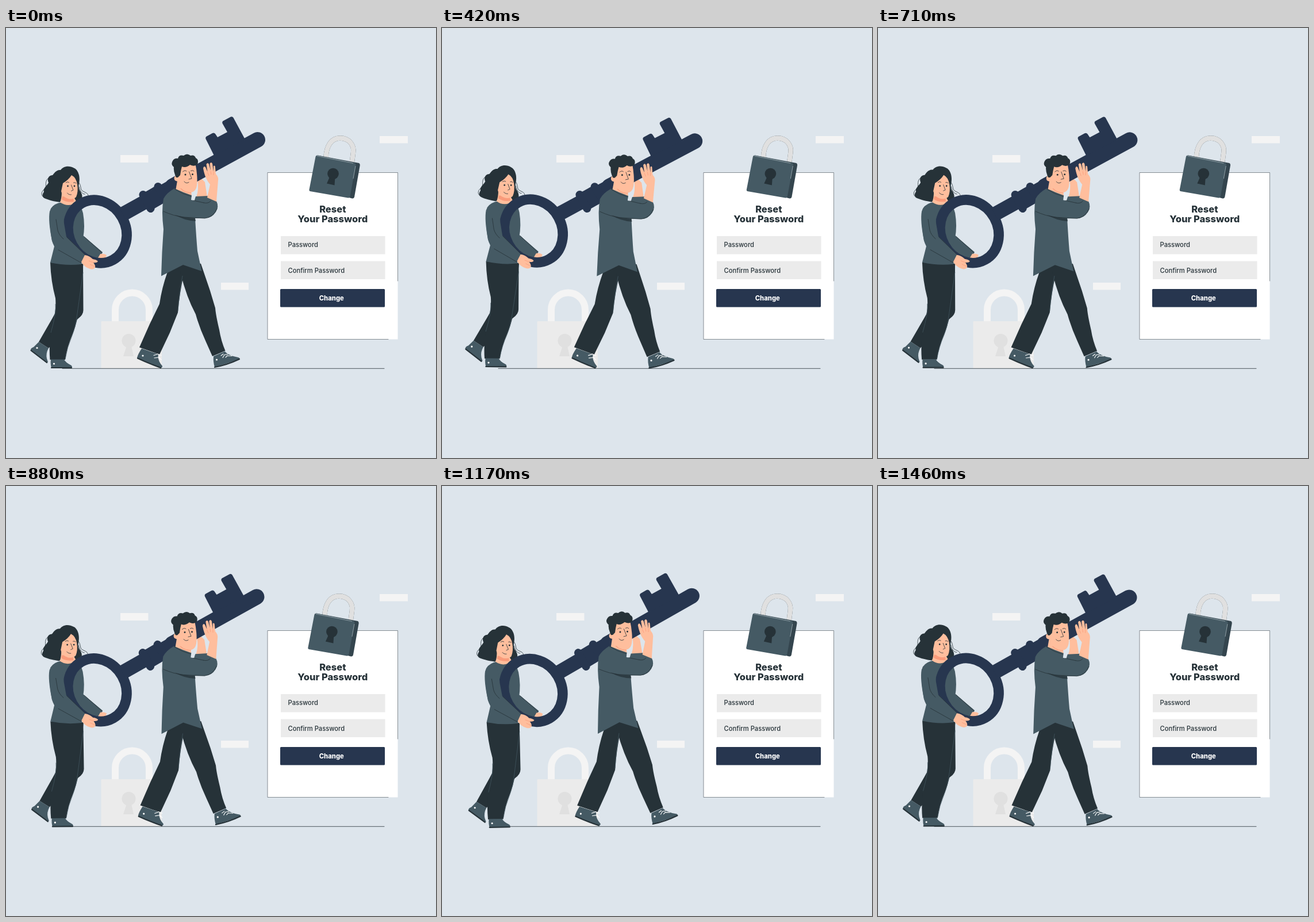
Animation, 748 px wide and 748 px high, one loop 1.5 s. Source, as an HTML page:

```html
<!DOCTYPE html>
<html lang="en">
<head>
<meta charset="utf-8">
<title>Reset your password</title>
<style>
  html, body { margin: 0; height: 100%; overflow: hidden; background: #dde5ec; }
  svg { display: block; width: 100vw; height: 100vh; font-family: Montserrat, Inter, sans-serif; }
  .dark { fill: #263238; }
  .cloth { fill: #455a64; }
  .skin { fill: #ffbe9d; }
  .shade { fill: #f99b7b; }
  .navy { fill: #27364f; }
  .grey { fill: #ebebeb; }
  .line { fill: none; stroke: #263238; stroke-width: .8; stroke-linecap: round; stroke-linejoin: round; }
  .seam { fill: none; stroke: #455a64; stroke-width: .7; }
  .shaft { fill: none; stroke: #27364f; }
  .sole { fill: none; stroke: #263238; stroke-width: 2.2; stroke-linecap: round; }
  .lace { fill: none; stroke: #fff; stroke-width: 1.1; stroke-linecap: round; }
  text { fill: #263238; }
</style>
</head>
<body>
<svg viewBox="0 0 748 748">
  <!-- backdrop -->
  <path fill="#f4f4f4" d="M199 221h48.500v13h-48.500zM650 188h49v12.500h-49zM374 443h48v12.500h-48z"/>
  <path fill="none" stroke="#f4f4f4" stroke-width="12" d="M190 511V490a29.500 29.500 0 0 1 59 0V511"/>
  <path class="grey" d="M165.500 511.500Q165.500 510 167 510H269Q271 510 271 512V592H165.500Z"/>
  <path fill="#e0e0e0" d="M210 553L204 571H222L218 553Z"/>
  <circle cx="213.500" cy="544" r="12" fill="#e0e0e0"/>
  <path class="line" d="M98 592.300H658"/>

  <!-- form -->
  <path fill="#fff" d="M455 251.500H681.500V541.500H455Z"/>
  <path class="line" opacity=".65" d="M681.500 440V251.500H455V541.500H665"/>
  <g text-anchor="middle" font-weight="800" font-size="16.500">
    <text x="568.300" y="320.500">Reset</text>
    <text x="568.300" y="338">Your Password</text>
  </g>
  <path class="grey" d="M478 362H659.500V393.500H478ZM478 405.500H659.500V437H478Z"/>
  <rect class="navy" x="477" y="454" width="182" height="31.500" rx="1.500"/>
  <g font-size="11.200" font-weight="500">
    <text x="490.500" y="381">Password</text>
    <text x="490.500" y="426">Confirm Password</text>
    <text x="566.300" y="473.500" text-anchor="middle" font-weight="800" style="fill:#fff">Change</text>
  </g>

  <!-- padlock -->
  <g id="lock">
    <path id="shackle" fill="none" stroke-width="8.300" d="M556.500 226C557 205 566 191.500 581 191.500C598 191.500 606 205 604 217L601.500 236"/>
    <use href="#shackle" stroke="#37474f" stroke-width="9.300"/>
    <use href="#shackle" stroke="#e0e0e0"/>
    <path fill="#34454e" d="M542 221.500L614 235Q616 236 615.700 239L606 294Q605 297 602 296.500L590 293Z"/>
    <path class="cloth" d="M542 221.500L606 234.500Q609 235 608.500 238L598.500 293Q598 296 595 295.500L529 284Q527 283.500 527.500 281L538.500 224Q539 221 542 221.500Z"/>
    <path fill="none" stroke="#c5d0d5" stroke-width=".6" d="M541 222.500L604 235.200M608 240L604 262"/>
    <path class="dark" d="M564 257L558 270.500L571.500 273.500L572.500 258Z"/>
    <circle class="dark" cx="569" cy="253.500" r="9.800"/>
  </g>

  <g id="carriers">
    <!-- woman: legs -->
    <path class="dark" d="M134 408L134.500 490Q135 499 125 506L112 518L74 557L57 546L80 506L100 470Z"/>
    <path class="dark" d="M77 408Q78 440 86 470Q88 492 80 517Q74 548 76.500 577H103Q106 555 116 532Q124 512 126 493L134.500 410Z"/>
    <path class="seam" d="M134 425L124 497Q121 520 115 535Q106 556 103 576M86 480Q88 495 78 530"/>
    <path class="cloth" d="M57 546L74 557Q69 566 71 575L73 581Q71 584 66 579L43 561Q42 557 48 555Z"/>
    <path class="sole" d="M43.500 561L71 582"/>
    <path class="cloth" d="M78 576.500H101Q104 582 112 586Q116 588 114.500 591H79Q77 585 78 576.500Z"/>
    <path class="sole" d="M79 591H114"/>
    <g fill="#fff"><circle cx="54" cy="556.500" r="1.600"/><circle cx="83.500" cy="584" r="1.600"/></g>

    <!-- woman: head and torso -->
    <path class="dark" d="M119 244C109 238 99 241 95 247C87 246 83 254 81 256C74 256 71 263 74 269C70 276 64 279 66 285C62 291 63 295 69 297C79 301 88 302 93 303L111 296L125 303Q137 298 130 285Q125 280 127 271C130 256 124 246 119 244Z"/>
    <path class="line" d="M77 259C64 266 73 275 67 280S61 290 64 293M126 268C132 274 128 281 134 284S143 288 143 292M127 276C129 286 134 289 137 289"/>
    <path class="cloth" d="M97 303Q84 305 78 314Q73 330 80 370L84 380L77 408Q104 414 131 411L137 388L134 366Q138 345 134 322Q131 309 122 303Z"/>
    <path class="skin" d="M97 283Q97 297 94 303Q108 313 123 303L118 294Z"/>
    <path class="shade" d="M97 298Q105 304 118 302L117 295L98 293Z"/>
    <path class="skin" d="M99 270Q109 264 114 256Q122 260 124 272Q126 285 122 294Q117 299 108 297Q98 294 96 284Z"/>
    <path class="line" d="M104 269Q107 266.500 109.500 268.500M117.500 269Q120 268 122 270M113.500 273L117 282L113.500 283.500M106.500 287Q109 290.500 113.500 290"/>
    <g class="dark"><circle cx="107.500" cy="275" r="1.400"/><circle cx="119" cy="275" r="1.400"/></g>
    <path class="cloth" d="M134 361L168 390L162 402L128 390Z"/>
    <path class="line" d="M136 363L167 391"/>
    <path class="skin" d="M164 393Q171 392 175 395L171 405L157 405Z"/>

    <!-- man: far arm -->
    <path class="skin" d="M333 255L346 268L350 294L331 294Q336 280 333 265Z"/>
    <path class="cloth" d="M330 293L352 292V312H324Z"/>

    <!-- key -->
    <g class="shaft">
      <ellipse rx="49.300" ry="56.300" stroke-width="17.600" transform="translate(159 354) rotate(-29)"/>
      <path stroke-width="25" d="M203 324L300 270"/>
      <path stroke-width="27" stroke-linecap="round" d="M290 275L437.500 194.500"/>
      <path stroke-width="33" d="M246 302L272 287"/>
      <path stroke-width="14" stroke-linecap="round" d="M238.500 290L251.500 314M264.500 276L279 299"/>
    </g>
    <path class="navy" d="M362 222L347.500 193Q346.500 190 349 188.500L359 183Q362 181.500 364 184L368 190L385 181L376.500 166Q375.500 163 378 161.500L391 154.500Q394 153.500 395.500 156L416 194Z"/>

    <!-- woman: near arm -->
    <path class="cloth" d="M90 307Q79 310 76 319Q73 335 80 370Q83 381 91 386L131 409L139 396L105 363L101 340Q100 312 90 307Z"/>
    <path class="line" d="M87 333L90 352Q92 360 100 367M91 386L130 408M106 364L138 395"/>
    <path class="skin" d="M137 395Q145 396 151 402Q158 403 160 406Q158 409 152 408Q156 413 155 417Q152 421 146 419Q136 416 131 407Z"/>
    <path fill="none" stroke="#f99b7b" stroke-width=".8" d="M144 405L152 408M146 411L154 415"/>

    <!-- man: legs -->
    <path class="dark" d="M281 424Q271 452 267 480L250 515L232 555.500L267 568L285 530L299 495Q302 460 309 430L335 405H300Z"/>
    <path class="dark" d="M300 405L304 428Q314 468 330 498Q336 520 347 544L359 571L381.500 561.500Q374 544 371 525Q365 500 364 487L355 457L339 410Z"/>
    <path class="seam" d="M307 431Q301 465 299 492"/>
    <path class="cloth" d="M236 557.500L265 567.500Q263 578 272 588Q272 592 267 591Q245 582 228 574Q229 568 236 557.500Z"/>
    <path class="sole" d="M229 574.500Q247 583 269 591"/>
    <path class="cloth" d="M361 571L380.500 562.500Q387 570 404 573Q408 574 405 577L363 590Q360 580 361 571Z"/>
    <path class="sole" d="M363 590Q385 586 406 576"/>
    <path class="lace" d="M257 569.500L264 567L270 569.500M258 574L266 573L270 577M374 570L378 567M377 573.500L380 568.500L386 567.500M382 573L385 570L393 570.500"/>
    <g fill="#fff"><circle cx="238" cy="570" r="1.600"/><circle cx="366.500" cy="577" r="1.600"/></g>

    <!-- man: head -->
    <path class="skin" d="M299 260L295 283L323 292L322 280Z"/>
    <path class="shade" d="M303 279Q310 287 322 287L322 280Z"/>
    <path class="skin" d="M300 239L329 234Q334 258 332 274Q330 286 320 286Q307 285 302 275L299 267Q291 266 293 259Q296 255 300 259Z"/>
    <path class="dark" d="M296 260Q291 250 292 242Q286 237 290 231Q293 226 299 227Q301 220 309 222Q315 217 321 222Q328 220 330 226Q336 229 333 237Q328 242 320 238Q313 244 306 241Q304 248 303 256L299 260Z"/>
    <path class="line" d="M307.500 250Q311 246.500 314 249M321.500 248.500Q325 246.500 327 249M318.500 250L323 262L318 263M310 267Q313 271.500 318 268.500"/>
    <g class="dark"><circle cx="312" cy="255" r="1.500"/><circle cx="324.500" cy="254.500" r="1.500"/></g>

    <!-- man: shirt and near arm -->
    <path class="cloth" d="M293 279Q308 286 323 291L322 299L344 304L350 294L366 301Q371 311 365 320Q358 331 346 331H329Q331 365 333 388L340.500 423L308 412L270 431.500Q271 390 274 350Q270 318 274 297Q279 287 293 279Z"/>
    <path class="dark" opacity=".75" d="M294 325Q310 330 329 331L330 336Q310 335 294 325Z"/>
    <path class="line" d="M293 280Q307 289 322 293M274 319Q292 327 308 329L346 331Q361 329 367 314M344 304Q352 306 356 301M326 300L344 304"/>
    <path class="skin" d="M350 295L355 272Q346 262 343 244Q344 239 347 242L350.500 250L348.500 237Q351 233 353 237L356 248L354.500 236Q357 232 359 236L361 250L361 240Q364 238 364 243L365 254Q370 259 369 265L366 302Z"/>
    <path fill="none" stroke="#f99b7b" stroke-width=".8" d="M350.500 251L353 257M356 249L357 255M361 250L361 256"/>
  </g>
</svg>
<script>
  const FRAMES = 36, DURATION = 1500;
  const lock = document.getElementById("lock");
  const carriers = document.getElementById("carriers");

  // [step, x offset] of the padlock's sideways wiggle
  const wiggle = [[0, 0], [6, 2], [13, 2.6], [14, 4.4], [17, -2.7], [24, -1.7], [28, 1.8], [35, 0], [36, 0]];

  function lockShift(step) {
    const i = wiggle.findIndex(([s]) => s > step);
    const [s0, x0] = wiggle[i - 1], [s1, x1] = wiggle[i];
    const u = (step - s0) / (s1 - s0);
    return x0 + (x1 - x0) * u * u * (3 - 2 * u);
  }

  function carrierTilt(step) {
    const sway = Math.sin(step / FRAMES * 2 * Math.PI);
    return sway * (sway > 0 ? 0.7 : 1);
  }

  const start = performance.now();
  function draw() {
    const t = (performance.now() - start) % DURATION;
    const step = Math.floor(t / DURATION * FRAMES + 0.2) % FRAMES;
    lock.setAttribute("transform", `translate(${lockShift(step)})`);
    carriers.setAttribute("transform", `rotate(${carrierTilt(step)} 246 373)`);
    requestAnimationFrame(draw);
  }
  draw();
</script>
</body>
</html>
```
